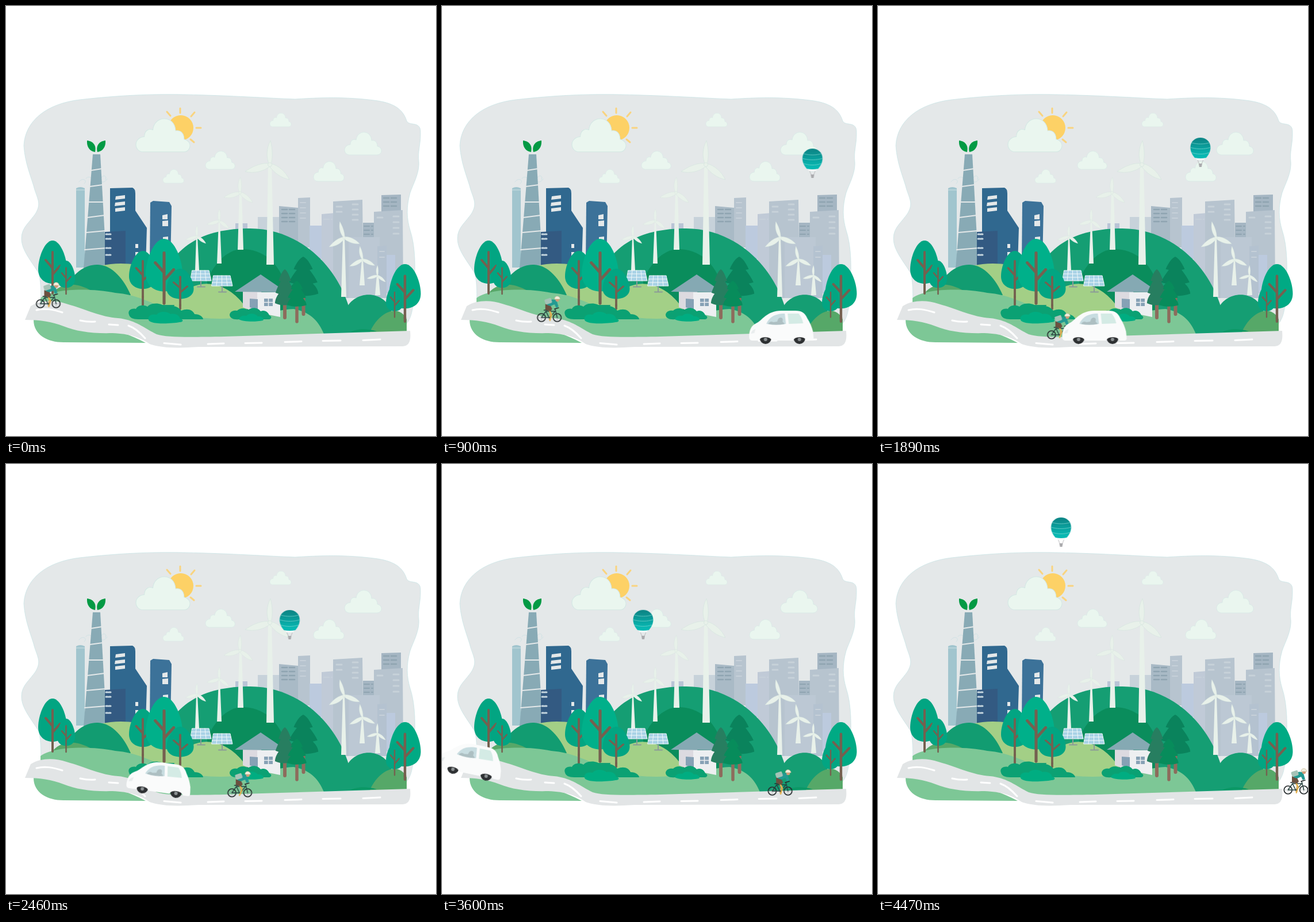
An HTML page without scripts for the animation above (4.5 s loop, 748 by 748 pixels).

```html
<!DOCTYPE html>
<html lang="en">
<head>
<meta charset="utf-8">
<title>Green city</title>
<style>
html, body { margin: 0; width: 100%; height: 100%; overflow: hidden; background: #fff; }
svg { display: block; width: 100%; height: 100%; }
.line { fill: none; stroke-linecap: round; stroke-linejoin: round; }
.trunk { stroke: #75604f; stroke-width: 4; }
.mover { animation: 4.5s linear infinite; }
#bike { animation-name: ride; }
#car { animation-name: drive; }
#balloon { animation-name: drift; }

@keyframes ride {
  0% { transform: translate(73.5px, 518px); }
  12% { transform: translate(145.5px, 532px); }
  20% { transform: translate(186.5px, 542px); }
  24% { transform: translate(210.5px, 547px); }
  30.67% { transform: translate(247.5px, 558px); }
  36% { transform: translate(272.5px, 569px); }
  40% { transform: translate(301px, 572px); }
  54.67% { transform: translate(406.5px, 572px); }
  69.33% { transform: translate(512px, 570.5px); }
  80% { transform: translate(588px, 569px); }
  99.33%, 100% { transform: translate(727px, 567px); }
}
@keyframes drive {
  0% { transform: translate(812px, 580px); }
  12% { transform: translate(665px, 580px); }
  20% { transform: translate(592.5px, 580px); }
  30.67% { transform: translate(479px, 580px); }
  45% { transform: translate(352px, 580px); }
  48% { transform: translate(326px, 577px) rotate(3deg); }
  54.67% { transform: translate(266.5px, 569px) rotate(7.7deg); }
  69.33% { transform: translate(139px, 549.5px) rotate(7deg); }
  80% { transform: translate(48px, 537px) rotate(11.7deg); }
  98%, 100% { transform: translate(-62px, 514px) rotate(12deg); }
}
@keyframes drift {
  0% { transform: translate(780px, 297px); }
  12% { transform: translate(697px, 274px); }
  16% { transform: translate(669px, 262px); }
  20% { transform: translate(644.5px, 266px); }
  24% { transform: translate(630.5px, 281px); }
  27.5% { transform: translate(627px, 293px); }
  30.67% { transform: translate(623px, 294px); }
  36% { transform: translate(597.5px, 269px); }
  42% { transform: translate(561px, 247px); }
  48% { transform: translate(525.5px, 257px); }
  54.67% { transform: translate(493.5px, 272px); }
  62% { transform: translate(452px, 291px); }
  69.33% { transform: translate(414px, 294.5px); }
  75% { transform: translate(378px, 287px); }
  80% { transform: translate(350px, 272px); }
  84% { transform: translate(333px, 238px); }
  90% { transform: translate(324px, 183px); }
  96% { transform: translate(319px, 135px); }
  99.33%, 100% { transform: translate(318.5px, 111px); }
}
</style>
</head>
<body>
<svg viewBox="0 0 748 748">
<defs>
  <linearGradient id="envelope" x1="0" y1="0" x2="0" y2="1">
    <stop offset=".1" stop-color="#0d8888"/><stop offset=".85" stop-color="#08b8b2"/>
  </linearGradient>
  <path id="cloud" d="M8 40C-3 39-3 23 10 22 10 14 16 12 20 14 22-4 46-4 47 15 54 14 57 19 57 25 67 27 66 40 56 40Z" fill="#eaf6ef" stroke="#d3e7e4" stroke-width=".7"/>
  <path id="crown" d="M0 0C14 0 25 30 25 50 25 66 14 75 0 75S-25 66-25 50C-25 30-14 0 0 0Z"/>
  <path id="branches" class="line trunk" d="M0 20V92M0 59L13 44M0 48L-12 34"/>
  <g id="rotor">
    <path d="M-1 0C-7-14-6-28 1-42 5-27 5-12 2 0Z"/>
    <path d="M0-2C-13-4-29 2-43 12-26 16-10 11 0 3Z"/>
    <path d="M2-2C16 2 27 12 34 26 19 23 8 14 0 4Z"/>
    <circle r="3.5"/>
  </g>
  <path id="pine" d="M0 0C5 3 9 12 12 21L8 22C12 29 16 36 18 43L12 45C17 51 19 58 19 62 8 67-8 67-19 62-19 58-17 51-12 45L-18 43C-16 36-12 29-8 22L-12 21C-9 12-5 3 0 0Z"/>
  <g id="panel">
    <path d="M3 0H32L36 18H0Z" fill="#a8d2e6"/>
    <path class="line" stroke="#f1f8fa" d="M10 0 8 18M17.500 0V18M25 0 27 18M2 6H33M1 12H35M3 0H32L36 18H0Z"/>
    <path class="line" stroke="#8b9a98" stroke-width="2" d="M18 19V28M12 28.500H25"/>
  </g>
</defs>

<!-- sky -->
<path fill="#e4e8e9" stroke="#c4e2e4" stroke-width=".7" d="M31 243C33 200 70 170 128 163 200 155 250 153 310 154 400 156 450 160 503 162 560 158 600 159 640 164 675 168 691 180 697 200 700 206 708 204 715 207 722 211 721 217 721 225 721 240 716 255 718 270 720 290 708 310 703 325 696 350 697 370 703 390 713 420 712 460 710 490 709 525 706 549 690 558H62C58 540 64 490 57 465 45 445 27 425 27 405 27 385 40 378 52 360 60 345 57 340 50 320 45 300 33 275 31 243Z"/>
<circle cx="304" cy="212" r="22" fill="#fdd166"/>
<path class="line" stroke="#f9d480" stroke-width="3" d="M303 178V186M328 185 322 192M280 184 286 191M339 212H331M327 237 321 232"/>
<use href="#cloud" transform="translate(226 195) scale(1.47)"/>
<use href="#cloud" transform="translate(459 186) scale(.58 .6)"/>
<use href="#cloud" transform="translate(589 219)"/>
<use href="#cloud" transform="translate(347 252) scale(.8)"/>
<use href="#cloud" transform="translate(535 270) scale(.83 .87)"/>
<use href="#cloud" transform="translate(273 284) scale(.57 .6)"/>

<!-- pale city -->
<g fill="#b7c4cf">
  <path fill="#b9c4d6" d="M399 378H420V392H399Z"/>
  <path fill="#c7d2da" d="M438 367H476V410H438Z"/>
  <path fill="#a9bac6" d="M475 348 508 351V410H475Z"/>
  <path d="M508 334 529 333V420H508Z"/>
  <path fill="#bccade" d="M528 382H551V440H528Z"/>
  <path fill="#c0cad7" d="M549 362 573 360V490H549Z"/>
  <path fill="#a5b6c3" d="M621 377H641V420H621ZM653 329 687 328V360H653Z"/>
  <path d="M569 340 620 337 622 508H585L569 470ZM640 358 690 355 691 490H640Z"/>
  <path fill="#bcc8d4" d="M596 402H650V508H596Z"/>
  <path fill="#b4c2d0" d="M646 418 662 417V508H646Z"/>
  <path fill="#bccade" d="M662 433H677V500H662Z"/>
</g>
<g class="line" stroke-width="3" stroke-dasharray="9 4" stroke-linecap="butt">
  <path d="M480 354H503M480 361H503M480 368H503M480 375H503M657 334H683M657 341H683M657 348H683" stroke="#8fa4b1" stroke-width="2.500"/>
  <path d="M575 349H588M575 358H588M603 345H616M603 354H616M603 363H616M603 372H616M646 368H658M674 366H686M674 376H686M674 386H686M674 396H686" stroke="#c7d2d9"/>
  <path d="M512 342H525M512 351H525M512 360H525M512 369H525M553 371H567M650 427H658M650 437H658" stroke="#c6d0d9" stroke-width="2"/>
  <path d="M623 383H638M623 390H638M623 397H638" stroke="#8fa4b1" stroke-width="2"/>
</g>

<!-- chimneys and blue towers -->
<path fill="#a1c5ce" d="M122 317Q129 313 137 317V455H122Z"/>
<path class="line" stroke="#d0e2e5" d="M122 320H137M127 306C133 297 143 304 136 309M139 300C146 293 152 302 150 307M165 303C165 293 177 293 173 302M166 306Q171 308 176 301"/>
<path fill="#88aab5" d="M151 258H164L175 456H135Z"/>
<path class="line" stroke="#e4e8e9" stroke-width="2" d="M148 286 167 283M146 314 168 311M144 341H171M141 368 172 364M140 394 173 391M137 424 174 421"/>
<path fill="#039a44" d="M141 234C151 235 158 242 155 254 146 253 140 245 141 234ZM173 234C163 235 156 242 159 254 168 253 174 245 173 234Z"/>
<path fill="#30688f" d="M181 317 220 316Q225 318 225 326V356L245 386 243 450H181Z"/>
<path fill="#335a82" d="M172 393 208 391V453H172Z"/>
<path fill="#3c7299" d="M251 342 256 339 284 341 288 348 286 450H250Z"/>
<path fill="#e4e8e9" d="M191 331 207 329V335L190 337ZM190 342 207 340V346L189 348ZM190 352 207 350V356L190 358ZM272 364 281 362V371H272ZM272 374 282 373V383H272ZM273 402 282 401V408H273ZM225 414H230V421H225ZM225 428H230V435H225Z"/>
<path class="line" stroke="#c6d6df" stroke-width="3" stroke-linecap="butt" stroke-dasharray="3 2" d="M174 397H183M174 405H183M174 421H183M174 433H183"/>

<!-- hills -->
<g fill="#159e73">
  <path d="M262 500C285 415 345 387 425 387 500 387 570 440 596 522V573H290Z"/>
  <path d="M590 530C603 497 649 492 667 523L690 572H553Z"/>
</g>
<path fill="#0a8d5c" d="M350 475C372 432 395 422 415 423 455 425 478 455 488 490V530H350Z"/>
<path fill="#a3cf86" d="M165 452C215 440 280 455 325 500L330 520H165Z"/>
<path fill="#56a868" d="M632 570C645 535 682 515 697 545V570Z"/>
<path fill="#129c71" d="M100 500C115 462 140 449 160 450 185 451 205 475 217 503H100Z"/>
<path fill="#57a768" d="M78 503C92 483 117 477 150 496Z"/>
<path fill="#a3d087" d="M285 545C300 465 388 462 426 540V545Z"/>

<!-- turbines -->
<g fill="#e8f1ea">
  <path d="M456 276H462L466 450H453ZM406 325H410L413 424H403ZM370 374H372L375 448H367ZM331 401H333L336 460H329ZM586 403H589L592 506H583ZM619 441H621L624 486H615ZM645 468H648L651 503H642Z"/>
  <g stroke="#d5e4de" stroke-width=".7">
    <use href="#rotor" x="459" y="276"/>
    <use href="#rotor" transform="translate(407 325) scale(.65)"/>
    <use href="#rotor" transform="translate(371 374) scale(.5)"/>
    <use href="#rotor" transform="translate(332 401) scale(.46)"/>
    <use href="#rotor" transform="translate(588 403) rotate(-16) scale(.68)"/>
    <use href="#rotor" transform="translate(620 441) rotate(-12) scale(.56)"/>
    <use href="#rotor" transform="translate(646 469) scale(.42)"/>
  </g>
</g>

<!-- meadow and road -->
<path fill="#7dc796" d="M60 508C85 490 150 491 190 499 250 504 280 538 335 542 420 550 450 530 500 527 532 532 546 552 554 573L270 582 60 540ZM48 546C90 540 180 552 243 586L100 585C72 585 48 572 48 546Z"/>
<path fill="#e2e5e6" d="M33 546 43 522C60 511 85 511 105 518 140 528 165 541 195 543 225 546 240 560 262 571 280 577 320 576 380 575L703 565C705 585 700 591 690 592L335 593C290 596 268 594 250 588 235 577 215 570 185 569 150 570 122 566 100 557 80 549 58 546 33 546Z"/>
<path class="line" stroke="#fff" stroke-width="3" d="M53 529C68 525 82 528 98 533M129 547Q142 550 155 549M179 554 195 555M213 556Q227 561 242 578M275 586.500 304 589M351 588 379 587M416 586.500 445 586M485 584.500 514 583.500M551 582.500 582 582M621 581.500 651 580"/>

<use href="#panel" x="321" y="460"/>
<use href="#panel" x="358" y="469"/>

<!-- house -->
<path fill="#dcdae0" d="M412 494 443 470 446 538 412 524Z"/>
<path fill="#edeff1" d="M437 498H477V541L437 533Z"/>
<path fill="#85a9b3" d="M398 497 443 467 481 493 477 498Z"/>
<path fill="#86a1b5" d="M424 509 438 510V531L424 524ZM449 509H464V522H449Z"/>
<path class="line" stroke="#edeff1" stroke-width="1.500" d="M456.500 509V522M449 515.500H464"/>

<!-- pines -->
<path class="line" stroke="#8d6c5c" stroke-width="6" stroke-linecap="butt" d="M517.500 490V536M485 505V542"/>
<use href="#pine" fill="#0a835c" transform="translate(517 436) scale(1.38 1.04)"/>
<use href="#pine" fill="#277e60" transform="translate(485 458) scale(.9 .95)"/>
<path class="line" stroke="#8d6c5c" stroke-width="5.500" stroke-linecap="butt" d="M506 510V549"/>
<use href="#pine" fill="#078c5b" transform="translate(506 478) scale(.88 .68)"/>

<!-- broadleaf trees -->
<g fill="#02a582">
  <g transform="translate(81 408)"><use href="#crown"/><use href="#branches"/></g>
  <g transform="translate(104.500 443) scale(.63)"><use href="#crown"/><use href="#branches"/></g>
  <g transform="translate(238 426) scale(.96 .88)"><use href="#crown"/><use href="#branches"/><path class="line trunk" d="M0 90V110"/></g>
  <g transform="translate(275 405) scale(1.28 1.22)" fill="#00b08a"><use href="#crown"/><use href="#branches"/></g>
  <g transform="translate(303 457) scale(.94 .7)"><use href="#crown"/><use href="#branches"/><path class="line trunk" d="M0 90V100"/></g>
  <g transform="translate(694 449) scale(1.1 1.03)" fill="#00aa84"><use href="#crown"/><use href="#branches"/><path class="line trunk" d="M0 90V97"/></g>
  <g transform="translate(676 486) scale(.6)"><use href="#crown"/><use href="#branches"/></g>
</g>
<path fill="#0ba173" d="M214 537C211 530 218 525 226 527 229 520 240 519 246 523 255 514 272 517 277 524 289 519 300 523 305 530 316 525 325 529 328 536 337 536 343 541 343 545H230C221 545 215 542 214 537ZM389 537C390 531 396 529 402 530 407 525 416 525 421 529 430 522 439 526 443 531 451 528 456 533 458 538 463 540 462 544 458 545H405C396 546 389 543 389 537Z"/>
<path fill="#00ad81" d="M248 546C246 539 254 535 262 537 267 530 281 531 286 536 296 534 302 539 303 544 310 546 308 550 302 550 285 553 250 554 248 546ZM405 545C407 539 413 538 418 539 424 533 434 535 438 540 445 539 450 544 447 547 434 550 410 549 405 545Z"/>
<path fill="#0a9865" d="M600 567C610 561 630 561 645 566Z"/>

<g id="balloon" class="mover">
  <path class="line" stroke="#b9b9bb" d="M-6 18-2 28M6 18 2 28"/>
  <path fill="#f4f8f8" d="M-11 13H11L6 21H-6Z"/>
  <path fill="url(#envelope)" d="M-17.500 0C-18-24 18-24 17.500 0 17 7 14 12 10 17Q0 19-10 17C-14 12-17 7-17.500 0Z"/>
  <path class="line" stroke="#8fdcd6" stroke-width=".7" stroke-dasharray="3 1" d="M-15-9Q0-5 15-9M-17.500-1Q0 4 17.500-1M-15.500 8Q0 13 15.500 8"/>
  <path fill="#a9a9ac" d="M-3 27H3L2 33H-2Z"/>
</g>

<g id="bike" class="mover">
  <g class="line">
    <path stroke="#d8a85c" stroke-width="2" d="M-2-15 2-7 0 3">
      <animate attributeName="d" dur=".9s" repeatCount="indefinite" values="M-2-15 2-7 0 3;M-2-15 5-9 3-1;M-2-15 2-7 0 3"/>
    </path>
    <g stroke="#252a2c" stroke-width="1.700"><circle cx="-13.700" r="7"/><circle cx="13.700" r="7"/></g>
    <path stroke="#8b9292" stroke-width=".5" d="M-20 0H-7M-13.700-6V6M7 0H20M13.700-6V6"/>
    <path stroke="#27423f" stroke-width="1.500" d="M-13.700 0-6-11H10L0 1-6-11M-13.700 0H0M13.700 0 10-15"/>
    <path stroke="#252a2c" stroke-width="1.700" d="M-9-13H-3M9-15 16-17"/>
    <path stroke="#e5b24f" stroke-width="2.300" d="M0-13 4-5 1 5">
      <animate attributeName="d" dur=".9s" repeatCount="indefinite" values="M0-13 4-5 1 5;M0-13 3-4-2 4;M0-13 4-5 1 5"/>
    </path>
  </g>
  <path fill="#6b503f" d="M-7-24 1-23 5-15 2-11-7-14Z"/>
  <path fill="#239a92" d="M-5-25C0-31 8-34 13-29L16-19 12-17 9-23 2-20-4-22Z"/>
  <rect x="-8" y="-33" width="12" height="9" rx="2" transform="rotate(-18 -2 -29)" fill="#a6c3b7"/>
  <circle cx="14" cy="-31" r="3.200" fill="#d49c78"/>
  <path fill="#f1eedf" stroke="#bba980" stroke-width=".6" d="M9-32C9-39 18-39 19-32Z"/>
</g>

<g id="car" class="mover">
  <g fill="#2d3032"><circle cx="-29.500" cy="-2" r="10"/><circle cx="29.500" cy="-2" r="10"/></g>
  <path fill="#fafbfb" d="M-58-5C-58-17-54-24-46-28-36-32-28-50-2-50H22C34-50 39-46 43-37 48-29 51-22 53-14L54-4Q55 2 50 2H42Q39-4 30-4T18 2H-18Q-21-4-30-4T-41 2H-53Q-58 2-58-5Z"/>
  <path fill="#c8dde1" d="M-28-27C-24-37-15-45 4-45L6-27Q-11-24-28-27Z"/>
  <path fill="#adbfc2" d="M-25-27Q-21-33-16-30L-9-31Q-8-38-3-38 2-37 0-31L4-27Q-11-24-25-27Z"/>
  <path fill="#d4ebe5" d="M9-45H28Q34-38 36-28L11-27Z"/>
  <path fill="#e9edee" d="M-55-10Q-53-17-47-18L-49-11Z"/>
  <g fill="#8c9193"><circle cx="-29.500" cy="0" r="3"/><circle cx="29.500" cy="0" r="3"/></g>
</g>
</svg>
</body>
</html>
```
